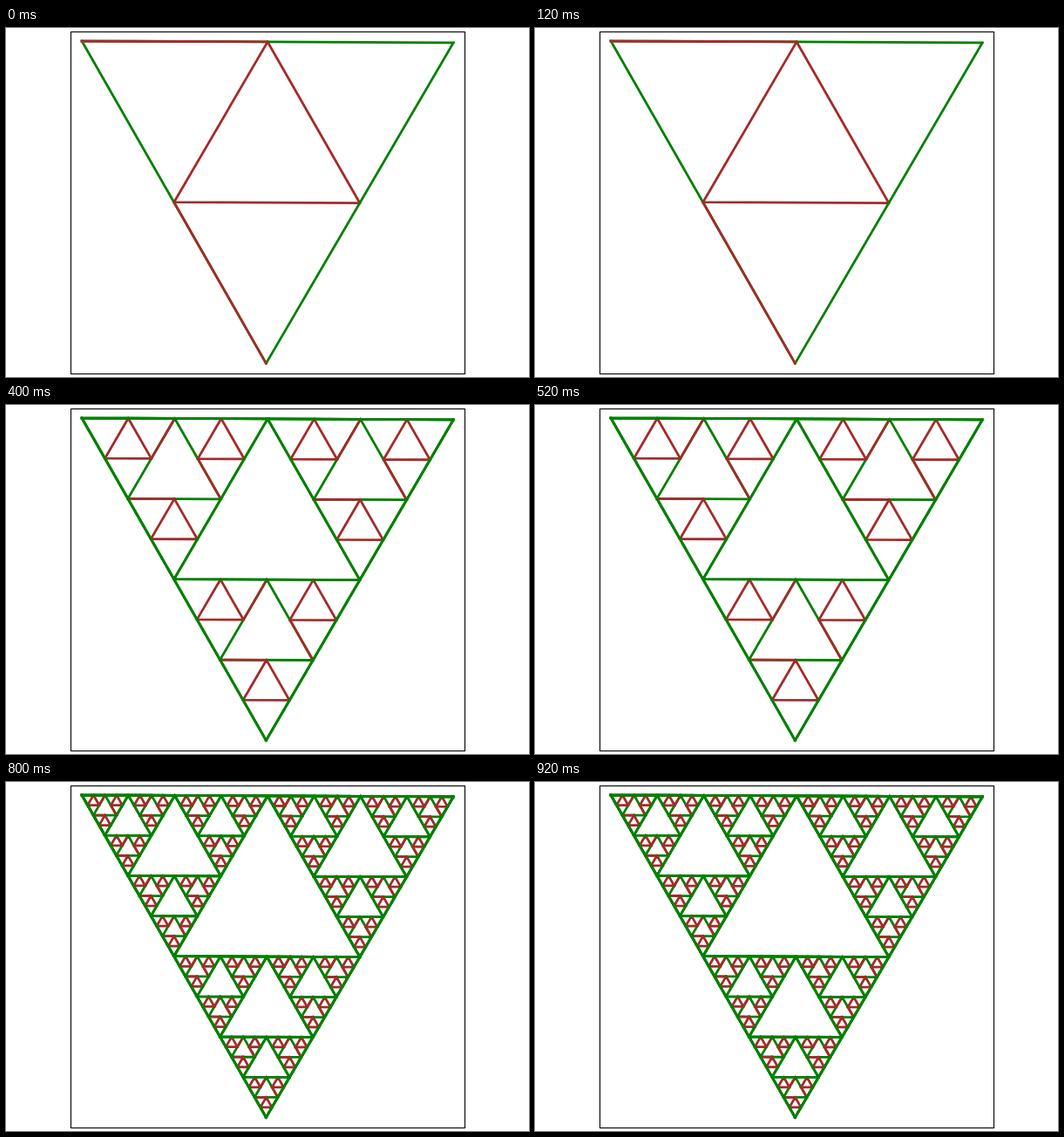
An HTML page for the animation above (1 s loop, 600 by 400 pixels).

```html
<!DOCTYPE html>
<html lang="en">
<head>
<meta charset="utf-8">
<title>Triangle subdivision</title>
<style>
  html, body { margin: 0; width: 100%; height: 100%; overflow: hidden; background: #fff; }
  svg { display: block; width: 600px; height: 400px; }
</style>
</head>
<body>
<svg viewBox="0 0 600 400" fill="none">
  <rect x="74.5" y="4.5" width="452" height="392" stroke="#000" stroke-width="1.1"/>
  <g id="stage" stroke-width="2.78" stroke-linecap="square"></g>
</svg>
<script>
const STEP = 200, DEPTHS = 5;
const GREEN = '#008000', BROWN = '#a52a2a';
const OUTER = [[87, 15], [513.3, 16.8], [298.4, 384.4]];
const stage = document.getElementById('stage');

const mid = (p, q) => [(p[0] + q[0]) / 2, (p[1] + q[1]) / 2];
const line = (p, q) => `M${p}L${q}`;
const outline = t => t.map((p, i) => line(p, t[(i + 1) % 3])).join('');
const firstHalf = (t, i) => line(t[i], mid(t[i], t[(i + 1) % 3]));

// rings[0] holds the outer triangle; each later ring holds the holes one level deeper
const rings = [[OUTER]];
let cells = [OUTER];
for (let k = 0; k < DEPTHS; k++) {
  const holes = [], next = [];
  for (const [a, b, c] of cells) {
    const ab = mid(a, b), ac = mid(a, c), bc = mid(b, c);
    holes.push([ab, ac, bc]);
    next.push([a, ab, ac], [ab, b, bc], [ac, bc, c]);
  }
  rings.push(holes);
  cells = next;
}

const path = (d, color) => `<path d="${d}" stroke="${color}"/>`;
const ringPath = k => rings[k].map(outline).join('');

function halves(k) {
  const sides = k ? [0, 1, 2] : [0, 2];
  return rings[k].map(t => sides.map(i => firstHalf(t, i)).join('')).join('');
}

function drawing(n) {
  let out = path(ringPath(n + 1), BROWN) + path(ringPath(n), GREEN) + path(halves(n), BROWN);
  // edges shared by more levels are stroked more often, which firms up their rims
  for (let k = n - 1; k >= 0; k--) out += path(ringPath(k), GREEN).repeat(n - k + 1);
  return out;
}

const drawings = Array.from({ length: DEPTHS }, (_, n) => drawing(n));
let shown = -1;

function render(time) {
  const n = Math.floor(time / STEP) % DEPTHS;
  if (n === shown) return;
  shown = n;
  stage.innerHTML = drawings[n];
}

const start = performance.now();
function tick(now) {
  render(Math.max(0, now - start));
  requestAnimationFrame(tick);
}
render(0);
requestAnimationFrame(tick);
</script>
</body>
</html>
```
